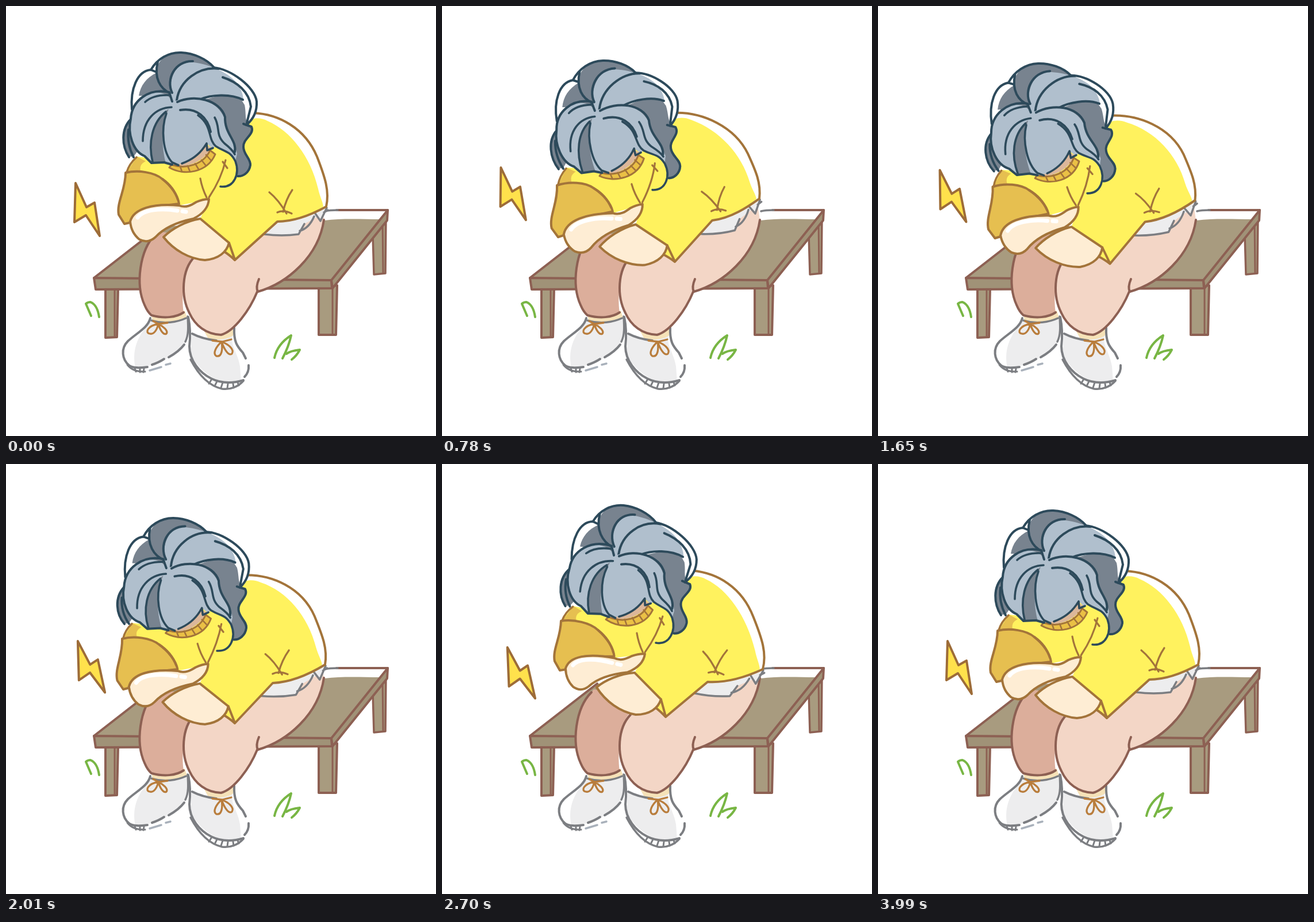
Write an HTML page with a canvas that moves like this. It is 748 px wide and 748 px high and loops after 4830 ms.

```html
<!DOCTYPE html>
<html lang="en">
<head>
<meta charset="utf-8">
<title>Resting on a bench</title>
<style>
html, body { margin: 0; width: 100%; height: 100%; overflow: hidden; background: #fff; }
canvas { display: block; width: 748px; height: 748px; }
</style>
</head>
<body>
<canvas id="stage" width="748" height="748"></canvas>
<script>
const ctx = document.getElementById('stage').getContext('2d');
const LOOP = 4830, STEP = 30;

const WOOD = '#a89b7f', WOOD_SIDE = '#a09277', BARK = '#8d6053';
const SKIN = '#f3d6c6', SKIN_DARK = '#dcae9b', ARM = '#feedd4', SOCK = '#f6e2b8';
const YELLOW = '#fff25e', MUSTARD = '#e6bf50', SEAM = '#a3743a';
const HAIR = '#b0bfcd', SHADE = '#78838f', INK = '#2d4a5b';
const SHOE = '#ededee', GREY = '#7c7e82', LEAF = '#78b644', LACE = '#b97d3c';

// Each part: path, fill, stroke, line width
const ground = [
  ['M638 398 L640 467 L660 465 L661 362 Z', WOOD, BARK, 3.5],
  ['M655 372 L656 465', null, BARK, 3],
  ['M173 492 L173 577 L193 576 L195 492 Z', WOOD, BARK, 4],
  ['M189 493 L189 576', null, BARK, 3],
  ['M544 489 L544 572 L574 572 L576 486 Z', WOOD, BARK, 4],
  ['M568 490 L568 572', null, BARK, 3],
  ['M153 473 L270 382 L555 355 L664 355 L566 477 Z', '#fff'],
  ['M153 473 L270 382 L470 385 L554 373 C585 369 620 371 650 371 L566 477 Z', WOOD],
  ['M153 473 L566 477 L567 491 L156 493 Z', WOOD_SIDE, BARK, 4],
  ['M566 477 L664 355 L663 373 L568 491 Z', WOOD_SIDE, BARK, 4],
  ['M153 473 L270 382 M575 355 L664 355', null, BARK, 4],
  ['M555 357 C562 355 568 355 577 355', null, GREY, 3.5],
  ['M148 539 L139 518 Q142 515 147 515 Q159 520 162 541', null, LEAF, 4],
  ['M467 612 Q472 588 496 573 Q492 592 481 613 M488 605 Q494 600 511 598 Q506 608 497 615', null, LEAF, 4],

  // socks and shoes
  ['M253 535 L255 549 C278 556 300 551 315 542 L311 530 Z', SOCK],
  ['M345 566 L352 579 C368 585 385 582 395 573 L396 558 Z', SOCK],
  ['M246 556 C228 576 219 600 225 629 C250 630 292 612 312 588 C318 570 316 555 314 543 C294 553 268 554 252 548 Z', SHOE],
  ['M251 543 C247 560 227 569 212 583 C199 596 202 615 214 625 C222 631 236 629 246 628', null, GREY, 4],
  ['M253 547 C275 554 298 550 313 543 M316 540 C317 557 318 572 312 584', null, GREY, 3.5],
  ['M254 624 Q266 620 275 614 M283 611 Q301 601 310 589', null, GREY, 4],
  ['M211 624 Q221 637 242 636 M224 630 L226 636 M233 631 L233 637 M240 631 L239 637', null, GREY, 3],
  ['M250 634 L270 628 M278 624 L286 622', null, '#a9b1bb', 3.5],
  ['M325 570 C350 583 377 583 394 574 C390 590 404 605 407 627 L409 653 C374 661 343 642 322 609 C320 595 324 586 322 570 Z', SHOE],
  ['M317 541 C321 560 321 574 319 592 C319 617 337 638 357 648 C377 658 396 656 413 651', null, GREY, 4],
  ['M321 615 C335 642 354 661 376 666 C392 668 405 661 413 652', null, GREY, 3.5],
  ['M358 649 L353 657 M367 653 L363 661 M377 655 L374 664 M386 657 L385 665 M395 657 L396 664 M403 655 L405 660', null, GREY, 3],
  ['M324 570 Q341 579 366 582 M397 560 C396 584 402 592 412 603 L417 613 M422 625 Q423 637 415 645', null, GREY, 4],
  ['M256 548 L265 553 L281 551 M265 553 C247 556 241 568 250 570 C258 572 263 562 265 553 C268 564 274 573 279 570 C283 565 273 557 265 553', null, LACE, 3.3],
  ['M359 582 L376 584 L392 580 M375 584 C365 593 359 605 366 609 C376 611 377 596 375 584 C380 598 387 609 393 605 C398 597 386 588 375 584', null, LACE, 3.3],

  // legs
  ['M264 392 C232 425 225 485 241 520 Q246 532 253 538 C275 544 296 542 309 533 C305 505 308 470 328 435 L320 400 Z', SKIN_DARK],
  ['M260 397 C232 425 225 485 241 520 Q246 532 253 538 C275 544 296 542 309 533', null, BARK, 4],
  ['M330 428 C306 454 303 505 319 534 C329 556 348 571 374 572 C397 566 424 529 437 497 C490 482 544 435 553 372 L550 352 L470 365 L380 400 Z', SKIN],
  ['M328 436 C305 460 304 505 319 534 C329 556 348 571 374 572 C397 566 424 529 437 497', null, BARK, 4],
  ['M440 475 Q434 489 438 497 C490 482 544 435 553 372', null, BARK, 4]
];

const FAR_ARM = 'M216 375 C222 352 256 343 301 347 C313 352 323 346 331 341 Q342 336 353 336 C352 352 342 362 326 370 C292 377 272 389 260 402 Q247 414 232 406 C222 398 217 386 216 375 Z';

const figure = [
  // shorts
  ['M474 372 L449 397 Q480 401 509 397 L519 379 L541 367 L547 375 L559 353 L550 347 Z', SHOE],
  ['M449 397 Q480 401 509 397 L519 379 M511 391 Q527 387 536 366 M538 361 L547 374 L558 351 M553 359 L560 355', null, GREY, 3.5],

  // torso
  ['M430 186 C474 188 520 212 541 262 C555 298 563 322 557 349 C535 362 505 376 472 375 L398 442 L340 372 L300 345 L208 290 L228 262 L380 200 Z', '#fff'],
  ['M420 202 C427 194 442 193 455 200 C495 217 530 262 543 318 C546 332 551 340 552 349 C535 362 505 376 472 375 L398 442 L378 427 L388 412 L338 370 L352 337 L300 347 L208 290 L228 262 L300 270 L380 200 Z', YELLOW],
  ['M210 290 L228 262 L243 270 Q230 276 235 290 Z', MUSTARD],
  ['M210 289 Q214 275 227 263', null, SEAM, 3.5],
  ['M430 186 C474 188 520 212 541 262 C555 298 563 322 557 349 C535 361 505 375 472 375 L398 442 C392 436 384 430 378 426 M388 412 L398 441', null, SEAM, 4],
  ['M458 324 Q474 337 488 361 M498 320 Q487 336 482 358 M472 359 Q483 354 497 361', null, SEAM, 3.2],
  ['M382 268 Q375 300 353 333 M338 300 Q341 317 349 333 M377 271 L385 282', null, SEAM, 3.2],
  ['M278 268 C292 286 336 282 358 247 L330 232 Z', '#dcb79a'],
  ['M284 281 C310 296 350 290 364 258 L355 251 C344 275 314 285 288 276 Z', '#eac045', SEAM, 3],
  ['M303 279 L306 288 M316 278 L320 288 M329 274 L335 284 M340 268 L348 278 M348 259 L357 269', null, SEAM, 2.6],

  // near forearm
  ['M338 370 C312 374 288 388 274 402 C292 425 319 440 346 442 C370 440 384 428 388 412 Z', ARM, SEAM, 4],
  // far sleeve and arm
  ['M208 290 C230 285 258 289 272 301 C287 313 299 329 301 344 L250 350 Q224 360 215 377 L206 379 L196 363 C192 342 208 320 208 290 Z', MUSTARD, SEAM, 4],
  ['M272 301 Q292 315 299 337', null, SEAM, 4],
  [FAR_ARM, ARM],
  ['M229 368 C239 354 270 351 298 356 M307 357 L313 358', null, '#fff', 7],
  [FAR_ARM, null, SEAM, 4],

  // hair, back to front
  ['M217 197 C200 214 201 243 212 262 L222 262 L238 240 Z', SHADE],
  ['M217 197 C200 214 201 243 214 263 M213 215 Q210 240 222 263', null, INK, 4],
  ['M218 175 C217 142 229 113 253 111 L263 116 L290 160 Z', '#fff'],
  ['M231 156 C234 138 244 125 262 116 L291 160 Z', SHADE],
  ['M219 180 C216 145 228 113 252 111 L262 115', null, INK, 4],
  ['M362 106 C398 112 434 145 435 171 Q434 194 422 203 L400 160 Z', '#fff'],
  ['M330 167 L400 148 L415 172 C419 190 413 201 427 209 C433 223 412 231 413 245 C413 259 426 265 425 277 C423 290 412 297 403 296 C401 260 372 210 330 167 Z', SHADE],
  ['M413 205 L427 210 C433 223 412 231 413 245 C413 259 426 265 425 277 C423 290 412 297 403 296', null, INK, 4],
  ['M262 117 C261 94 281 80 305 81 C325 83 347 93 360 106 L300 122 L288 154 C268 147 262 135 262 117 Z', SHADE],
  ['M252 111 C263 92 283 80 305 81 C326 82 349 92 362 107 M264 97 C257 125 268 144 286 152', null, INK, 4],
  ['M291 168 C279 137 291 101 318 97 C342 99 378 109 399 131 Q412 147 413 162 C390 151 357 155 338 165 Z', HAIR],
  ['M289 151 C278 128 293 95 325 96 M297 164 C302 129 336 105 370 109 M336 163 C357 154 390 152 412 163', null, INK, 4],
  ['M360 107 C391 109 433 141 436 166 C437 185 429 198 418 207 M377 124 C402 132 423 149 426 175 L419 203', null, INK, 4],

  // fringe
  ['M290 167 C278 142 234 145 220 180 C208 208 216 247 241 261 L253 273 L276 272 L289 276 L306 274 Q331 265 345 245 L350 240 L359 248 L365 244 C382 255 390 252 399 270 L402 257 C397 232 385 228 382 203 C374 165 327 150 290 167 Z', HAIR],
  ['M283 179 C258 195 248 232 255 271 L278 273 C269 240 272 205 283 179 Z', SHADE],
  ['M289 166 L284 150 C249 142 219 164 217 196 C211 222 221 253 241 261 L253 273 L275 272 L289 276', null, INK, 4],
  ['M283 155 Q256 154 242 167 M288 176 C260 177 238 198 238 235 M278 184 C254 203 247 238 255 271 M279 187 C269 215 273 255 289 272 L300 277', null, INK, 3.6],
  ['M298 167 C327 153 372 163 381 193 C380 223 402 233 398 254 M303 181 C332 176 351 194 356 219', null, INK, 4],
  ['M363 194 C373 211 364 224 380 239 Q394 250 398 258 M334 190 C360 209 350 231 365 244 C382 255 390 252 399 270 C407 292 397 317 373 314', null, INK, 3.6],
  ['M306 274 Q331 265 345 245 L349 239 L350 251 L360 247', null, INK, 3.6]
];

// Pins bend the figure: rest x y, then x y at each inner key time
const keys = [0, 780, 1290, 2010, 2700, 3180, 3990];
const pins = [
  [304, 81, 279, 95, 265, 106, 290, 94, 315, 72, 312, 75],
  [291, 168, 268, 184, 255, 191, 281, 183, 301, 161, 297, 163],
  [372, 314, 365, 320, 360, 327, 366, 325, 371, 311, 371, 312],
  [205, 228, 190, 248, 181, 262, 194, 246, 207, 213, 206, 219],
  [437, 181, 412, 180, 398, 182, 424, 188, 443, 181, 440, 180],
  [208, 290, 200, 312, 197, 325, 202, 304, 207, 273, 207, 279],
  [206, 379, 202, 402, 203, 416, 204, 392, 205, 359, 205, 366],
  [350, 338, 346, 347, 343, 353, 349, 350, 350, 332, 350, 332],
  [398, 442, 405, 445, 409, 446, 398, 451, 389, 440, 391, 440],
  [557, 349, 552, 335, 548, 327, 555, 349, 558, 357, 560, 351],
  [520, 225, 510, 223, 504, 219, 515, 228, 521, 227, 520, 226],
  [472, 375, 470, 373, 465, 370, 464, 381, 462, 379, 465, 378]
];

// Bolt: time, tip x, tip y, turn in degrees
const boltKeys = [
  [0, 120, 307, 0], [1300, 89, 262, -1.6], [2000, 124, 307, -3.3],
  [2690, 113, 318, -4], [3620, 84, 316, -5], [3990, 120, 307, 0]
];
const bolt = new Path2D('M1 1 L20 43 L34 35 L43 93 L19 57 L-1 69 Z');

const mix = (a, b, k) => a + (b - a) * k;

function locate(times, t) {
  let i = 0;
  while (i < times.length - 2 && t >= times[i + 1]) i++;
  return [i, Math.min(1, (t - times[i]) / (times[i + 1] - times[i]))];
}

function posePins(t) {
  const [i, k] = locate(keys, t);
  const a = i * 2, b = (i + 1) % 6 * 2;
  return pins.map(p => [p[0], p[1], mix(p[a], p[b], k), mix(p[a + 1], p[b + 1], k)]);
}

// Moving least squares with local turn and scale
function bend(pose, x, y) {
  let sum = 0, px = 0, py = 0, qx = 0, qy = 0;
  const weights = pose.map(p => {
    const w = ((x - p[0]) ** 2 + (y - p[1]) ** 2 + 60) ** -1.3;
    sum += w;
    px += w * p[0]; py += w * p[1];
    qx += w * p[2]; qy += w * p[3];
    return w;
  });
  px /= sum; py /= sum; qx /= sum; qy /= sum;
  let re = 0, im = 0, norm = 0;
  pose.forEach((p, i) => {
    const w = weights[i], ax = p[0] - px, ay = p[1] - py, bx = p[2] - qx, by = p[3] - qy;
    re += w * (ax * bx + ay * by);
    im += w * (ax * by - ay * bx);
    norm += w * (ax * ax + ay * ay);
  });
  re /= norm; im /= norm;
  const dx = x - px, dy = y - py;
  return [qx + re * dx - im * dy, qy + im * dx + re * dy];
}

function bendPath(d, pose) {
  return d.replace(/([\d.]+) ([\d.]+)/g, (m, x, y) =>
    bend(pose, +x, +y).map(v => v.toFixed(2)).join(' '));
}

function paint(path, fill, stroke, width) {
  if (fill) {
    ctx.fillStyle = fill;
    ctx.fill(path);
  }
  if (stroke) {
    ctx.strokeStyle = stroke;
    ctx.lineWidth = width;
    ctx.stroke(path);
  }
}

const groundPaths = ground.map(([d, ...style]) => [new Path2D(d), ...style]);

function drawBolt(t) {
  const [i, k] = locate(boltKeys.map(b => b[0]), t);
  const [, x, y, turn] = boltKeys[i].map((v, j) => mix(v, boltKeys[i + 1][j], k));
  ctx.save();
  ctx.translate(x, y);
  ctx.rotate(turn * Math.PI / 180);
  paint(bolt, '#ffe14c', '#9d6c38', 4);
  ctx.restore();
}

function draw(t) {
  ctx.fillStyle = '#fff';
  ctx.fillRect(0, 0, 748, 748);
  ctx.lineCap = ctx.lineJoin = 'round';
  groundPaths.forEach(part => paint(...part));
  const pose = posePins(t);
  figure.forEach(([d, ...style]) => paint(new Path2D(bendPath(d, pose)), ...style));
  drawBolt(t);
}

const start = performance.now();
function tick() {
  const t = Math.max(0, performance.now() - start) % LOOP;
  draw(Math.floor(t / STEP) * STEP);
  requestAnimationFrame(tick);
}
draw(0);
requestAnimationFrame(tick);
</script>
</body>
</html>
```
